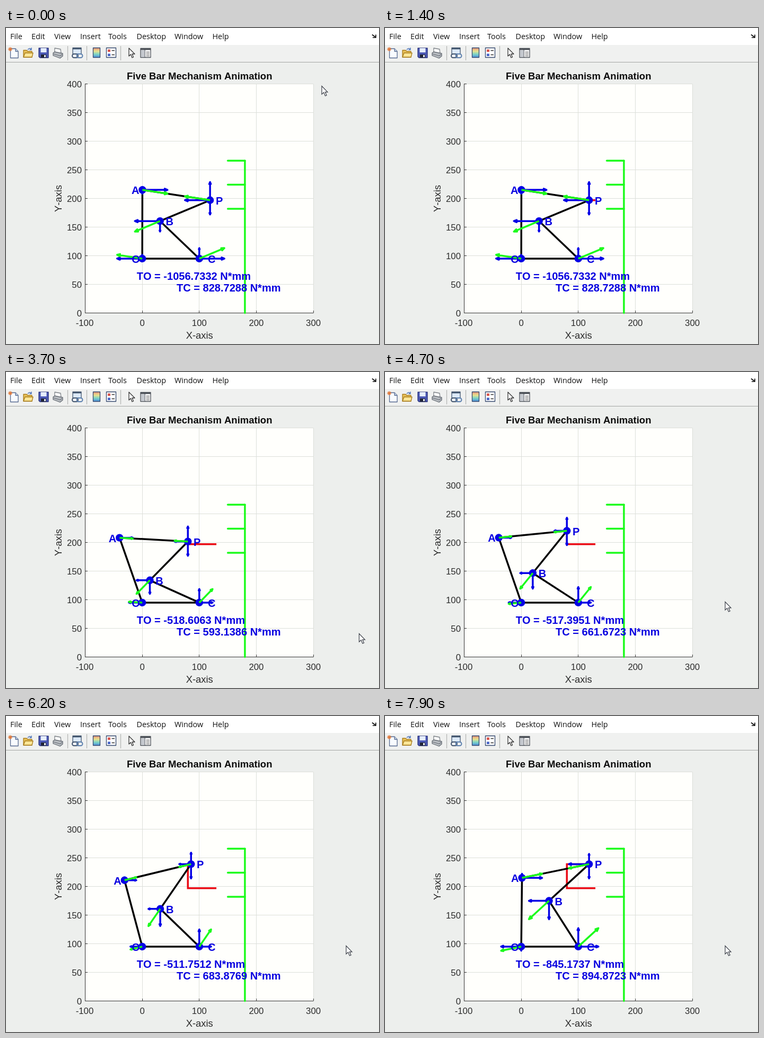
An HTML page that plays this animation: 704x596 px, repeating every 8000 ms.

```html
<!DOCTYPE html>
<html lang="en">
<head>
<meta charset="utf-8">
<title>Five Bar Mechanism Animation</title>
<style>
  html, body { margin: 0; width: 100%; height: 100%; overflow: hidden; background: #edefed; }
  svg { display: block; }
  text { font-family: "Liberation Sans", Arial, sans-serif; font-kerning: none; white-space: pre; }
  .menu text { font: 14.4px "Open Sans", sans-serif; fill: #111; }
  .tick text { font-size: 16.8px; fill: #2b2b2b; }
  .axis { font-size: 18.4px; fill: #2b2b2b; }
  .title { font-size: 18.5px; font-weight: bold; fill: #0c0c0c; }
  .label text { font-size: 20.05px; font-weight: bold; fill: #0800e0; }
  .line { fill: none; stroke-width: 3.5; }
  .bar { stroke: #000; }
  .rack { stroke: #1cfb1c; stroke-linecap: round; }
  .trail { stroke: #ea0a14; }
  .blue { stroke: #0500e6; stroke-linejoin: round; }
  .green { stroke: #1cfb1c; stroke-linejoin: round; }
</style>
</head>
<body>
<svg width="704" height="596" viewBox="0 0 704 596">
  <defs>
    <linearGradient id="spectrum" x2="0" y2="1">
      <stop offset="0" stop-color="#e8907c"/><stop offset=".35" stop-color="#e9e28c"/>
      <stop offset=".65" stop-color="#7ed6c4"/><stop offset="1" stop-color="#4d8fe0"/>
    </linearGradient>
  </defs>
  <rect width="704" height="596" fill="#edefed"/>
  <rect width="704" height="32" fill="#fff"/>
  <rect y="32" width="704" height="32" fill="#f0f1f0"/>
  <path d="M0 64.5H704" stroke="#a3a5a3"/>
  <g class="menu" id="menu"></g>
  <path d="M691 12.5L697 17M698 12.5V18H692" fill="none" stroke="#111" stroke-width="1.7"/>

  <g id="tools" stroke-width="1.3" stroke-linejoin="round">
    <path d="M116.5 34V61M152.5 34V61M216.5 34V61" stroke="#b4b6b4"/>
    <path d="M8.500 39H18L23 44V56.500H8.500Z" fill="#f8fbff" stroke="#56698f"/>
    <path d="M18 39V44H23" fill="#cfe0f4" stroke="#56698f"/>
    <path d="M8 36V44M4 40H12M5.300 37.300L10.700 42.700M10.700 37.300L5.300 42.700" stroke="#e0793c"/>
    <path d="M33 55V42H39L41 44H49V55Z" fill="#e8c158" stroke="#a87c1c"/>
    <path d="M33 55L36 47H51L49 55Z" fill="#fbe697" stroke="#a87c1c"/>
    <path d="M41 41Q45 36 48 41M48 37V41H44.500" fill="none" stroke="#4a72b8"/>
    <path d="M62 38H80V56H64L62 54Z" fill="#4b58b4" stroke="#28327c"/>
    <path d="M65.500 38H76.500V46H65.500Z" fill="#e6eefc"/>
    <path d="M66 50H76V56H66Z" fill="#202436"/>
    <path d="M72 51H75V55H72Z" fill="#e8ecf4"/>
    <path d="M92 47V38L103 40L104 48Z" fill="#fff" stroke="#7b8086"/>
    <path d="M89 47L92 45L107 48V53L102 57L89 52Z" fill="#b9bdc2" stroke="#666c74"/>
    <path d="M90 49L102 52.500L106 50" fill="none" stroke="#666c74"/>
    <path d="M126 37.500H142V49H126Z" fill="#dce9f8" stroke="#43566f"/>
    <path d="M126 39H142" stroke="#43566f" stroke-width="2.500"/>
    <rect x="125" y="49" width="11" height="7" rx="3.500" fill="#eef1f4" stroke="#43566f" stroke-width="2"/>
    <rect x="133.500" y="49" width="11" height="7" rx="3.500" fill="none" stroke="#5b7fae" stroke-width="2"/>
    <rect x="164.500" y="37.500" width="13" height="18" fill="url(#spectrum)" stroke="#34486e"/>
    <rect x="189.500" y="37.500" width="18" height="18" fill="#fff" stroke="#34486e"/>
    <path d="M192 40.500H197V45H192Z" fill="#d9534a"/>
    <path d="M192 48.500H197V53H192Z" fill="#4966c8"/>
    <path d="M199.500 42.500H205M199.500 50.500H205" stroke="#333" stroke-width="1.600"/>
    <path d="M232 38V53L235.500 49.800L238 56L240.500 55L238 49H243Z" fill="#fff" stroke="#333"/>
    <rect x="254" y="38.500" width="19" height="17" fill="#fff" stroke="#4a4f56"/>
    <path d="M254 40H273" stroke="#4a4f56" stroke-width="3"/>
    <path d="M262 41V55" stroke="#4a4f56"/>
    <path d="M255 42H261.500V55H255Z" fill="#c4c8ce"/>
    <path d="M264.500 45.500H271M264.500 49H271M264.500 52.500H271" stroke="#777"/>
  </g>

  <g id="plot"></g>
  <g id="scene"></g>
  <path id="cursor" d="M.5 .5V16L4.200 12.600L7 19L9.600 18L6.900 11.800H11.500Z" fill="#fff" stroke="#3b3f48" stroke-width="1.200"/>
</svg>
<script>
const LOOP = 8000, TICK = 100;
const LOAD = 5, FORCE_SCALE = 5;
const O = [0, 95], C = [100, 95];
const ARM_O = 120, ARM_C = 95;
const LOW = 197, HIGH = 239, NEAR = 80, FAR = 130;
const SCALE_X = 1.0765, SCALE_Y = 1.08;

// Corners visited by P: approach, retract, lift, insert.
const ROUTE = [[NEAR, LOW], [FAR, LOW], [NEAR, LOW], [NEAR, HIGH], [FAR, HIGH]];

// Pointer: time, x, y; no place means hidden.
const POINTER = [
  [0, 595.5, 109], [100], [2200, 520, 9], [2300, 522, 9], [2400, 524, 10],
  [2700, 556, 41], [2800, 566, 60], [2900, 575, 88], [3200, 640, 280],
  [3300, 672, 430], [3400, 675, 496], [3700, 666, 493], [3900, 650, 455], [4000, 641.5, 433]
];

const $ = id => document.getElementById(id);
const px = x => 149.5 + (x + 100) * SCALE_X;
const py = y => 537.5 - y * SCALE_Y;
const text = (s, x, y, attrs = "") => `<text x="${x}" y="${y}" ${attrs}>${s}</text>`;
const line = (points, cls) =>
  `<polyline class="line ${cls}" points="${points.map(([x, y]) => px(x) + "," + py(y)).join(" ")}"/>`;
const dot = ([x, y]) => `<circle cx="${px(x)}" cy="${py(y)}" r="7.2" fill="#0500e6"/>`;

function arrow([x, y], fx, fy, cls) {
  const x0 = px(x), y0 = py(y);
  const dx = fx * FORCE_SCALE * SCALE_X, dy = -fy * FORCE_SCALE * SCALE_Y;
  const x1 = x0 + dx, y1 = y0 + dy;
  const wing = side => `${x1 - dx * .11 - side * dy * .045} ${y1 - dy * .11 + side * dx * .045}`;
  return `<path class="line ${cls}" d="M${x0} ${y0}L${x1} ${y1}M${wing(1)}L${x1} ${y1}L${wing(-1)}Z"/>`;
}

// Joint between two equal links from base to tip, on the left side.
function elbow([bx, by], [tx, ty], len) {
  const dx = tx - bx, dy = ty - by, d = Math.hypot(dx, dy);
  const k = Math.sqrt(len * len - d * d / 4) / d;
  return [bx + dx / 2 - dy * k, by + dy / 2 + dx * k];
}

function drawStatic() {
  const items = { File: 8, Edit: 48, View: 91, Insert: 140, Tools: 193, Desktop: 246.5, Window: 318, Help: 389.5 };
  $("menu").innerHTML = Object.entries(items).map(([s, x]) => text(s, x, 21)).join("");

  let grid = "", ticks = "", labels = "";
  const pixel = v => Math.floor(v) + .5;
  for (let x = -100; x <= 300; x += 100) {
    grid += `M${pixel(px(x))} 105.500V537.500`;
    ticks += `M${pixel(px(x))} 537.500v-4.500`;
    labels += text(x, px(x) - (x < 0 ? 1 : 0), 562, 'text-anchor="middle"');
  }
  for (let y = 0; y <= 400; y += 50) {
    grid += `M149 ${py(y)}H580`;
    ticks += `M149.500 ${py(y)}h4.500`;
    labels += text(y, 143, py(y) + 6.5, 'text-anchor="end"');
  }
  $("plot").innerHTML =
    `<rect x="149" y="105" width="431" height="433" fill="#fffffc"/>
     <path d="${grid}" stroke="#dcdfda"/>
     <path d="M149.500 105V537.500H580${ticks}" fill="none" stroke="#333"/>
     <g class="tick">${labels}</g>` +
    text("Five Bar Mechanism Animation", 365.2, 97, 'class="title" text-anchor="middle"') +
    text("X-axis", 365.2, 586, 'class="axis" text-anchor="middle"') +
    text("Y-axis", 0, 0, 'class="axis" text-anchor="middle" transform="translate(104.500 321.500) rotate(-90)"');
}

function drawScene(step) {
  const seg = Math.floor(step / 10), u = step % 10 / 9;
  const [from, to] = [ROUTE[seg], ROUTE[seg + 1]];
  const P = from.map((v, i) => v + (to[i] - v) * u);
  const A = elbow(O, P, ARM_O), B = elbow(C, P, ARM_C);

  // Both upper links carry load along their length; horizontal parts balance.
  const slopeA = (A[1] - P[1]) / (P[0] - A[0]);
  const slopeB = (P[1] - B[1]) / (P[0] - B[0]);
  const h = LOAD / (slopeA + slopeB), va = h * slopeA, vb = h * slopeB;
  const torqueO = -(A[0] - O[0]) * va - (A[1] - O[1]) * h;
  const torqueC = -(B[0] - C[0]) * vb + (B[1] - C[1]) * h;

  const rack = [182, 224, 266].map(y => line([[150, y], [180, y]], "rack")).join("") +
    line([[180, 0], [180, 266]], "rack");
  const trail = seg ? line([...ROUTE.slice(1, seg + 1), P], "trail") : "";
  const forces = [[O, -h, va], [A, h, -va], [B, -h, -vb], [C, h, vb], [P, -h, va]];
  const blue = forces.map(([at, fx, fy]) =>
    arrow(at, fx, 0, "blue") + arrow(at, 0, at === P ? LOAD + va : fy, "blue")).join("") +
    arrow(P, 0, -LOAD, "blue");
  const green = forces.map(f => arrow(...f, "green")).join("");
  const name = (s, [x, y], dx) => text(s, px(x) + dx, py(y) + 8);
  const torque = v => +v.toFixed(4) + " N*mm";

  $("scene").innerHTML = rack + trail +
    line([O, A, P, B, C, O], "bar") + [O, A, B, C, P].map(dot).join("") + blue + green +
    `<g class="label">` +
    name("O", O, -20) + name("A", A, -20.5) + name("B", B, 10.8) + name("C", C, 16.2) + name("P", P, 10.8) +
    text("TO = " + torque(torqueO), 246.7, 475) + text("TC = " + torque(torqueC), 322, 497) + `</g>`;
}

let shown = -1;
function frame(now) {
  const t = Math.floor(now % LOOP / TICK) * TICK;
  const step = Math.max(7, 12 + Math.floor((t - 1385) / 251));
  if (step !== shown) drawScene(shown = step);

  const [, x, y] = POINTER.filter(p => p[0] <= t).pop();
  const cursor = $("cursor");
  cursor.style.display = x === undefined ? "none" : "";
  if (x !== undefined) cursor.setAttribute("transform", `translate(${x} ${y})`);
  requestAnimationFrame(() => frame(performance.now() - start));
}

drawStatic();
const start = performance.now();
frame(0);
</script>
</body>
</html>
```
